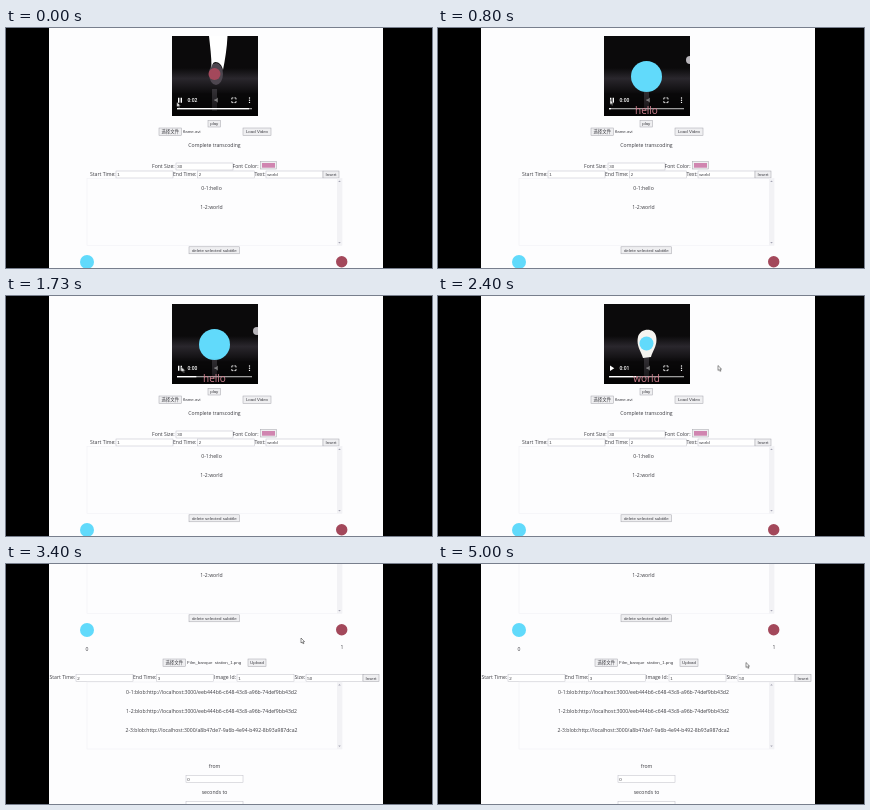
Write an HTML page that moves like this. It is 426 px wide and 240 px high and loops after 5.07 s.

```html
<!DOCTYPE html>
<html lang="en">
<head>
<meta charset="utf-8">
<title>Subtitle editor</title>
<style>
html, body { margin: 0; width: 100%; height: 100%; overflow: hidden; background: #000; }
svg { display: block; width: 100vw; height: 100vh; }
text { font: 5.1px "Open Sans", "Noto Sans", sans-serif; fill: #3c3c42; }
.ui { font: 4.4px "Liberation Sans", "Noto Sans CJK SC", "Noto Sans CJK", sans-serif; }
.mid { text-anchor: middle; }
.button { fill: #efeff1; stroke: #a2a2aa; stroke-width: .5; }
.field { fill: #fff; stroke: #bdbdc6; stroke-width: .5; }
.list { fill: none; stroke: #efeff4; stroke-width: .5; }
.clock { font: 500 5px Roboto, sans-serif; fill: #fff; }
.sub { font: 10px "Open Sans", sans-serif; fill: #d18291; text-anchor: middle; }

#page, #cursor, #played, #bulb, #moon, .late, .start, .second, .playing, .paused {
  animation: 5.07s linear infinite;
}
#page { animation-name: scroll; }
#cursor { animation-name: point; }
#played { animation-name: progress; transform-origin: 171px 80px; }
#bulb { animation-name: grow; transform-origin: 209px 62px; }
#moon { animation-name: drift; }
.late { animation-name: late; animation-timing-function: step-end; }
.start { animation-name: start; animation-timing-function: step-end; }
.second { animation-name: second; animation-timing-function: step-end; }
.playing { animation-name: playing; animation-timing-function: step-end; }
.paused { animation-name: paused; animation-timing-function: step-end; }

@keyframes scroll {
  0%, 53.8% { transform: translateY(0); }
  56.4% { transform: translateY(-50px); }
  59.1% { transform: translateY(-112px); }
  63.1%, 100% { transform: translateY(-168px); }
}
@keyframes point {
  0% { transform: translate(170.8px, 74px); }
  15.8% { transform: translate(172px, 71.5px); }
  34.1%, 42.4% { transform: translate(175.5px, 71px); }
  47.3%, 53.8% { transform: translate(280px, 69.5px); }
  67.1% { transform: translate(295px, 74px); }
  81.5% { transform: translate(301.5px, 76.5px); }
  98.6%, 100% { transform: translate(308px, 98.5px); }
}
@keyframes progress {
  0% { transform: scaleX(.96); }
  2%, 8.5% { transform: scaleX(1); }
  8.51%, 13.8% { transform: scaleX(0); }
  34.1% { transform: scaleX(.26); }
  42.4%, 100% { transform: scaleX(.36); }
}
@keyframes grow {
  0%, 35.5% { transform: scale(.35); }
  42.4%, 100% { transform: scale(1); }
}
@keyframes drift {
  0%, 15.8% { transform: translate(0, 0); }
  34.1%, 100% { transform: translate(-1px, 3px); }
}
@keyframes late { 0% { opacity: 1; } 8.5%, 100% { opacity: 0; } }
@keyframes start { 0% { opacity: 0; } 8.5% { opacity: 1; } 35.5%, 100% { opacity: 0; } }
@keyframes second { 0% { opacity: 0; } 35.5%, 100% { opacity: 1; } }
@keyframes playing { 0% { opacity: 1; } 42.4%, 100% { opacity: 0; } }
@keyframes paused { 0% { opacity: 0; } 42.4%, 100% { opacity: 1; } }
</style>
</head>
<body>
<svg viewBox="0 0 426 240" preserveAspectRatio="none">
  <defs>
    <clipPath id="screen"><rect x="166" y="8" width="85.5" height="80"/></clipPath>
    <clipPath id="window"><rect x="43" width="334" height="240"/></clipPath>
    <linearGradient id="shade" x2="0" y2="1">
      <stop offset="0" stop-color="#000" stop-opacity="0"/>
      <stop offset="1" stop-color="#000" stop-opacity=".7"/>
    </linearGradient>
    <linearGradient id="haze" x2="0" y2="1">
      <stop offset="0" stop-color="#2a272d" stop-opacity="0"/>
      <stop offset=".4" stop-color="#2a272d"/>
      <stop offset="1" stop-color="#2a272d" stop-opacity="0"/>
    </linearGradient>
  </defs>
  <g clip-path="url(#window)">
    <rect x="43" width="334" height="240" fill="#fdfdfe"/>
    <g id="page">
      <g clip-path="url(#screen)">
        <rect x="165" y="8" width="87" height="80" fill="#0b0a0b"/>
        <rect x="165" y="40" width="87" height="26" fill="url(#haze)"/>
        <rect x="206" y="61" width="5" height="22" fill="#343136"/>
        <g class="late">
          <ellipse cx="210" cy="46" rx="7" ry="11" fill="#4d464f"/>
          <path d="M203 8H221.5C221 20 219 32 217 42C216 37 213 34 209.5 34C207 34 206 37 205.5 40C205.5 28 204 18 203 8Z" fill="#fff"/>
          <circle cx="208.5" cy="46" r="6" fill="#a3485b"/>
        </g>
        <g class="start">
          <circle id="moon" cx="252" cy="32" r="4" fill="#b9b6bb"/>
          <circle cx="208.5" cy="48.5" r="15.5" fill="#61dafb"/>
        </g>
        <g class="second">
          <path id="bulb" d="M205 62C203 55 198 50 200 41C202 32 216 31 218 40C220 49 215 54 213 61Z" fill="#f5f4f0"/>
          <circle cx="208.5" cy="47.5" r="7" fill="#61dafb"/>
        </g>
        <rect x="165" y="62" width="87" height="26" fill="url(#shade)"/>
        <g fill="#fff">
          <path class="playing" d="M172 69.7h1.4v5h-1.4zM174.6 69.7h1.4v5h-1.4z"/>
          <path class="paused" d="M172 69.5l4.3 2.7l-4.3 2.7z"/>
          <path d="M208.5 71.2h1.4l2-1.7v5.2l-2-1.7h-1.4z" opacity=".4"/>
          <path d="M225.8 71.5v-1.6h1.6M228.4 69.9H230v1.6M230 73v1.6h-1.6M227.4 74.6h-1.6V73" fill="none" stroke="#fff" stroke-width=".8"/>
          <circle cx="243.5" cy="70" r=".7"/>
          <circle cx="243.5" cy="72.2" r=".7"/>
          <circle cx="243.5" cy="74.4" r=".7"/>
          <rect x="171" y="80" width="75" height="1.3" opacity=".6"/>
          <rect id="played" x="171" y="80" width="75" height="1.3"/>
        </g>
        <text class="clock late" x="181.5" y="74">0:02</text>
        <text class="clock start" x="181.5" y="74">0:00</text>
        <text class="clock second" x="181.5" y="74">0:01</text>
        <text class="sub start" x="208.5" y="86">hello</text>
        <text class="sub second" x="208.5" y="86">world</text>
      </g>
      <g id="form"></g>
      <rect x="254.5" y="133.5" width="16" height="7.5" class="button"/>
      <rect x="256" y="135" width="13" height="4.7" fill="#d085b0"/>
      <circle cx="81" cy="234" r="7" fill="#61dafb"/>
      <circle cx="335.7" cy="233.7" r="5.7" fill="#a3485b"/>
    </g>
    <path id="cursor" d="M0 0V5L1.2 4L2 5.8L2.9 5.4L2.1 3.7H3.6Z" fill="#fff" stroke="#222" stroke-width=".5"/>
  </g>
</svg>
<script>
const parts = [];
const label = (x, y, words, cls = "") =>
  parts.push(`<text x="${x}" y="${y + 1.8}" class="${cls}">${words}</text>`);
const centred = (y, words, x = 208.5) => label(x, y, words, "mid");
const box = (x, y, w, h, cls) =>
  parts.push(`<rect x="${x}" y="${y}" width="${w}" height="${h}" class="${cls}"/>`);

function button(x, y, w, words, h = 7) {
  box(x, y, w, h, "button");
  label(x + w / 2, y + h / 2 - .3, words, "ui mid");
}

function field(x, y, value) {
  box(x, y, 57, 7, "field");
  label(x + 1.2, y + 3.2, value, "ui");
}

// Each entry is a label, its x, the field's x and the value.
function row(y, entries, buttonX) {
  for (const [name, x, fieldX, value] of entries) {
    label(x, y + 3, name);
    field(fieldX, y, value);
  }
  if (buttonX) button(buttonX, y, 16, "Insert");
}

function list(y, items) {
  box(81, y, 255, 67, "list");
  parts.push(`<rect x="331" y="${y}" width="5" height="67" fill="#f2f2f5"/>
    <path d="M332.2 ${y + 3.5}l1.3-1.5l1.3 1.5zM332.2 ${y + 63.5}l1.3 1.5l1.3-1.5z" fill="#a5a5b4"/>`);
  items.forEach((item, i) => centred(y + 9.7 + i * 19.4, item, 205.5));
}

button(202, 92.5, 12.5, "play", 6.5);
button(153, 100, 22.5, "选择文件", 7.5);
label(177, 103.3, "flame.avi", "ui");
button(237, 100, 28, "Load Video", 7.5);
centred(117, "Complete transcoding");
row(135, [["Font Size:", 146, 170, "30"]]);
label(226.5, 138, "Font Color:");
row(143, [
  ["Start Time:", 84, 110, "1"],
  ["End Time:", 167, 191.5, "2"],
  ["Text:", 248.5, 260, "world"]
], 317);
list(150.5, ["0-1:hello", "1-2:world"]);
button(183, 218.8, 50.5, "delete selected subtitle");

label(81, 253.5, "0", "mid");
label(336, 251, "1", "mid");
button(157, 263, 22.5, "选择文件", 7.5);
label(181, 266.3, "Film_banque&#160; station_1.png", "ui");
button(242, 263, 18, "Upload", 7.5);
row(278.5, [
  ["Start Time:", 43.5, 70, "2"],
  ["End Time:", 127, 150.5, "3"],
  ["Image Id:", 208, 231, "1"],
  ["Size:", 288.5, 300, "50"]
], 357);
const first = "blob:http://localhost:3000/eeb444b6-c648-43c8-a96b-74def9bb43d2";
const last = "blob:http://localhost:3000/a8b47de7-9a6b-4e94-b492-8b93a987dca2";
list(286, ["0-1:" + first, "1-2:" + first, "2-3:" + last]);
centred(370, "from");
field(180, 379.5, "0");
centred(396, "seconds to");
field(180, 405.5, "1");

document.getElementById("form").innerHTML = parts.join("");
</script>
</body>
</html>
```
